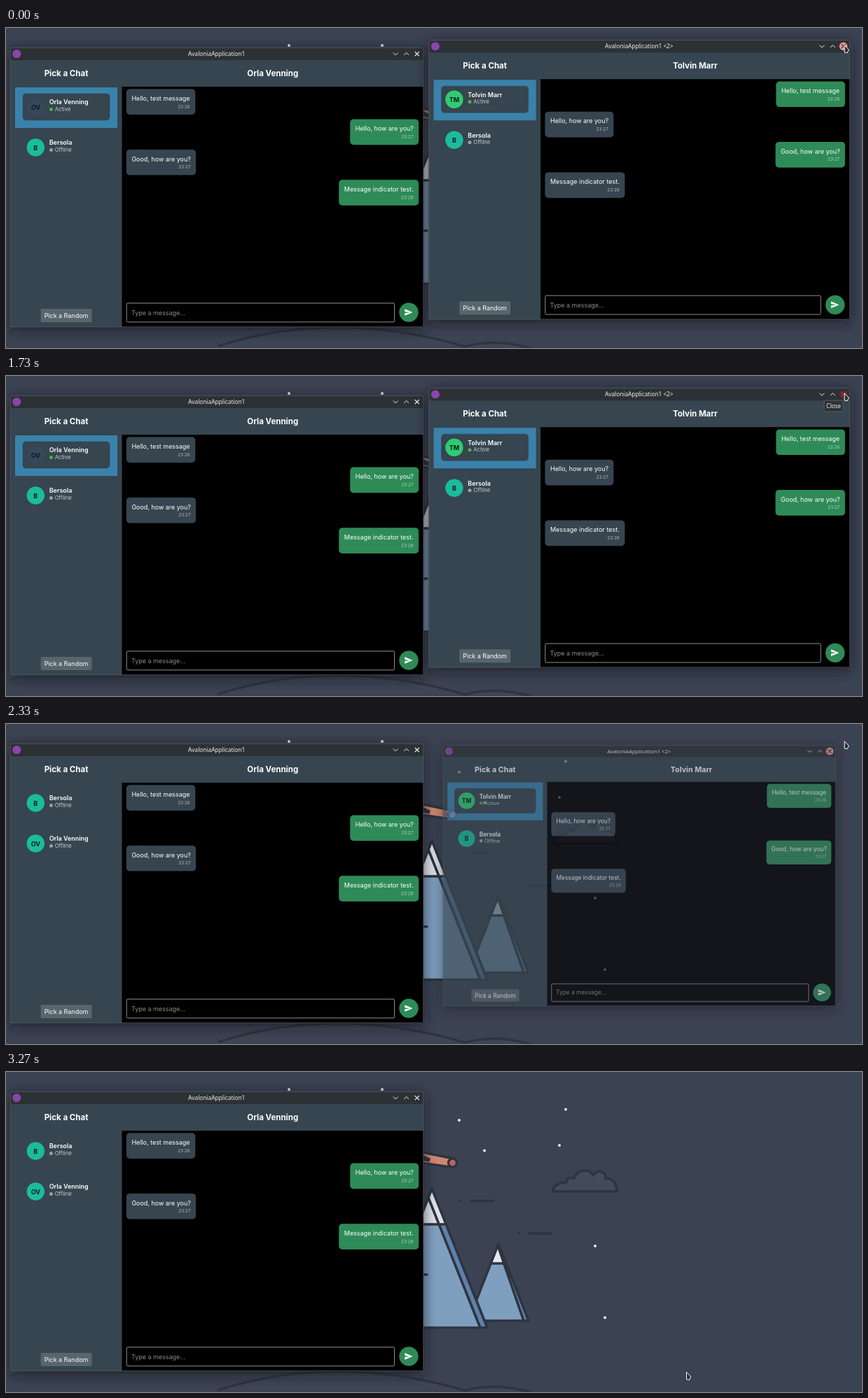
An HTML page for the animation above (3340 ms loop, 1222 px wide and 458 px high).

```html
<!DOCTYPE html>
<html lang="en">
<head>
<meta charset="utf-8">
<title>Chat windows</title>
<style>
  html, body { margin: 0; width: 100%; height: 100%; overflow: hidden; background: #3b4252; }
  svg { display: block; width: 100%; height: 100%; }
  text { font-family: Inter, "Open Sans", sans-serif; font-size: 8.96px; fill: #fff; }
  .bar { font-family: "Noto Sans", sans-serif; font-size: 8.25px; fill: #f0f1f2; }
  .head { font-size: 11.5px; font-weight: 700; }
  .name { font-weight: 600; }
  .status { font-size: 7.68px; fill: #c6ccd0; }
  .time { font-size: 6.4px; fill: #fff; fill-opacity: .62; }
  .initials { font-weight: 700; fill: #10181c; }
  .hint { fill: #8c8c8c; }
  .mid { text-anchor: middle; }
  .end { text-anchor: end; }
  .ink { fill: none; stroke: #2e3440; stroke-width: 3.6; stroke-linejoin: round; stroke-linecap: round; }
  .glyph { fill: none; stroke: #eff0f1; stroke-width: 1; }
</style>
</head>
<body>
<svg id="stage" viewBox="0 0 1222 458" preserveAspectRatio="none" xmlns="http://www.w3.org/2000/svg"></svg>
<script>
const LOOP = 3340;
const TICKS = [0, 470, 540, 600, 670, 1730, 1800, 1870, 1930, 2000, 2070, 2130,
  2200, 2270, 2330, 2400, 2470, 3130, 3200, 3270];
const ANNA = 'Orla Venning', ADA = 'Bersola', PEN = 'Tolvin Marr';
const SLATE = '#36454f', GREEN = '#2e8b57', TEAL = '#1abc9c';

const rect = (x, y, w, h, fill, more = '') =>
  `<rect x="${x}" y="${y}" width="${w}" height="${h}" fill="${fill}" ${more}/>`;
const circle = (x, y, r, fill, more = '') =>
  `<circle cx="${x}" cy="${y}" r="${r}" fill="${fill}" ${more}/>`;
const text = (x, y, cls, s) =>
  `<text x="${x}" y="${y}" class="${cls}">${s.replace(/</g, '&lt;')}</text>`;
const path = (d, more) => `<path d="${d}" ${more}/>`;
const clamp = v => Math.max(0, Math.min(1, v));

function wallpaper() {
  const stars = [[404, 25], [537, 25], [647, 69], [799, 53.5], [790, 105], [683, 112.5], [841, 249], [855, 351.5]];
  const ink = d => path(d, 'class="ink"');
  const fill = (d, c) => path(d, `fill="${c}"`);
  return rect(0, 0, 1222, 458, '#3b4252') +
    path('M304 455Q470 402 652 455', 'class="ink" style="fill:#3e4555"') +
    path('M654 456Q700 444 748 458', 'class="ink" style="fill:#3e4555"') +
    stars.map(([x, y]) => circle(x, y, 2, '#e5e9f0')).join('') +
    // small peak
    fill('M703 246L746 356H660V350Z', '#7f9fbf') +
    fill('M703 246L746 356H738L705 264Z', '#5e81ac') +
    fill('M703 246L714 274H691Z', '#e5e9f0') +
    ink('M703 246L660 356H746ZM691 274H713M703 251L739 356') +
    // large peak
    fill('M608 167L687 366H530Z', '#7f9fbf') +
    fill('M608 167L687 366H676L602 178Z', '#5e81ac') +
    fill('M608 167L628 218H588Z', '#dfe2e8') +
    ink('M608 167L530 366H687ZM588 218H628M603 180L677 366') +
    // spyglass
    path('M580 112L639 124L634 136L580 128Z', 'class="ink" style="fill:#d08770"') +
    fill('M596 119L606 124L604 129L596 127Z', '#2e3440') +
    circle(637.5, 130, 6, '#bf616a', 'stroke="#2e3440" stroke-width="3.4"') +
    // cloud and wind
    path('M780 171Q783 158 800 158Q801 149 811 152Q815 141 826 141Q835 141 838 148Q843 140 851 143Q857 146 856 153Q871 151 872 171Z',
      'class="ink" style="fill:#434a5a"') +
    ink('M648.5 184.5H649M664 184.5H696M731.5 231H732M747 231H779M590 290H601');
}

function contact(y, name, initials, colour, active, selected) {
  return (selected ? rect(7, y - 28, 146, 58, '#3a82ab') +
      rect(18, y - 19, 124, 38, SLATE, 'rx="4.5" stroke="#2f4653" stroke-opacity=".6"') : '') +
    circle(36.3, y, 12.7, colour) +
    text(36.3, y + 3.6, 'initials mid', initials) +
    text(55.7, y - 3.6, 'name', name) +
    circle(58.4, y + 3.6, 2.5, active ? '#4caf50' : '#9e9e9e') +
    text(63.7, y + 6.3, 'status', active ? 'Active' : 'Offline');
}

function bubble(i, W, w, mine, msg, time) {
  const x = mine ? W - 6.8 - w : 165.8, y = 59.2 + 43.35 * i;
  return rect(x, y, w, 36.7, mine ? GREEN : SLATE, 'rx="5"') +
    text(x + 7.6, y + 16.6, '', msg) +
    text(x + w - 7.6, y + 27.4, 'time end', time);
}

function chatWindow(W, title, peer, flip, contacts) {
  const H = 400, mid = (159.5 + W) / 2;
  const msgs = [[98.5, 'Hello, test message', '23:26'], [98, 'Hello, how are you?', '23:27'],
    [99.3, 'Good, how are you?', '23:27'], [114, 'Message indicator test.', '23:28']];
  return rect(0, 4, W, H, '#14171d', 'rx="4" opacity=".75" filter="url(#blur)"') +
    rect(0, 0, W, H, SLATE, 'rx="2"') +
    rect(0, 0, W, 18, '#2c3135', 'rx="2"') +
    rect(159.5, 56, W - 159.5, H - 56, '#000') +
    circle(9.3, 9, 6, '#8b44ac') +
    text(W / 2 - .3, 12, 'bar mid', title) +
    path(`M${W - 43.2} 7.4l3.4 3.4l3.4-3.4M${W - 27.8} 10.7l3.4-3.4l3.4 3.4`, 'class="glyph"') +
    `<g transform="translate(${W - 9.2} 9)" class="close">${closeGlyph('#eff0f1')}</g>` +
    text(80, 41.2, 'head mid', 'Pick a Chat') +
    text(mid, 40.8, 'head mid', peer) +
    contacts +
    msgs.map(([w, s, t], i) => bubble(i, W, w, (i % 2 === 1) !== flip, s, t)).join('') +
    rect(43.6, 374, 73, 19, '#58656d', 'rx="1.5"') +
    text(80, 386.8, 'mid', 'Pick a Random') +
    rect(166.2, 365.8, W - 207.7, 27, '#000', 'rx="1.5" stroke="#8f8f8f"') +
    text(173, 382.5, 'hint', 'Type a message...') +
    circle(W - 21, 379, 13.7, GREEN) +
    path('M2 21L23 12L2 3V10L17 12L2 14Z', `fill="#fff" transform="translate(${W - 27.8} 372.5) scale(.54)"`) +
    rect(.25, .25, W - .5, H - .5, 'none', 'rx="2" stroke="#555c62" stroke-width=".8"');
}

function closeGlyph(colour) {
  return path('M-3-3L3 3M3-3L-3 3', `stroke="${colour}" stroke-width="1.1"`);
}

const before = contact(85, ANNA, 'OV', '#34495e', true, true) + contact(143, ADA, 'B', TEAL);
const after = contact(85, ADA, 'B', TEAL) + contact(143, ANNA, 'OV', TEAL);
const others = contact(85, PEN, 'TM', '#2ecc71', true, true) + contact(143, ADA, 'B', TEAL);

const stage = document.getElementById('stage');
stage.innerHTML =
  `<defs><filter id="blur" x="-10%" y="-15%" width="120%" height="130%"><feGaussianBlur stdDeviation="9"/></filter></defs>` +
  wallpaper() +
  `<g transform="translate(6 28)">${chatWindow(590, 'AvaloniaApplication1', ANNA, false,
    `<g id="before">${before}</g><g id="after">${after}</g>`)}</g>` +
  `<g id="second">${chatWindow(601, 'AvaloniaApplication1 <2>', PEN, true, others)}</g>` +
  `<g id="tip">${rect(1168, 35, 27, 16, '#2d3236', 'rx="1.5" stroke="#5d6469" stroke-width=".9"')}${text(1181.5, 46, 'bar mid', 'Close')}</g>` +
  `<g id="cursor">${path('M.5 .5L6.6 6.8L4.6 11.4L.5 10.8Z', 'fill="#2a2e32" stroke="#fcfcfc" stroke-width="1" stroke-linejoin="round"')}</g>`;

const el = id => document.getElementById(id);
const second = el('second'), tip = el('tip'), cursor = el('cursor');
const closeBtn = second.querySelector('.close');
const show = (node, on) => node.setAttribute('display', on ? 'inline' : 'none');
let last = -1;

function draw(ms) {
  const t = TICKS.filter(k => k <= ms).pop();
  if (t === last) return;
  last = t;

  show(el('before'), t < 2200);
  show(el('after'), t >= 2200);

  // closing: shrink around the centre while fading
  const f = clamp((t - 2200) / 270) ** 1.5, s = 1 - .2 * f;
  show(second, f < 1);
  second.setAttribute('opacity', 1 - f);
  second.setAttribute('transform', `translate(904.1 217) scale(${s}) translate(-300.5 -199.8)`);

  const pressed = t >= 1730 && t < 1870;
  closeBtn.innerHTML = circle(0, 0, 5.8, pressed ? '#5a2a30' : '#f0938f') +
    closeGlyph(pressed ? '#963a40' : '#2c3135');

  tip.setAttribute('opacity', clamp((t - 400) / 270) * (1 - clamp((t - 1730) / 270)));

  const m = clamp((t - 3100) / 170), e = m * m * (3 - 2 * m);
  cursor.setAttribute('transform', `translate(${1196.5 - 225.5 * e} ${24.2 + 405 * e})`);
}

function frame() {
  draw((performance.now() - start) % LOOP);
  requestAnimationFrame(frame);
}
const start = performance.now();
draw(0);
requestAnimationFrame(frame);
</script>
</body>
</html>
```
